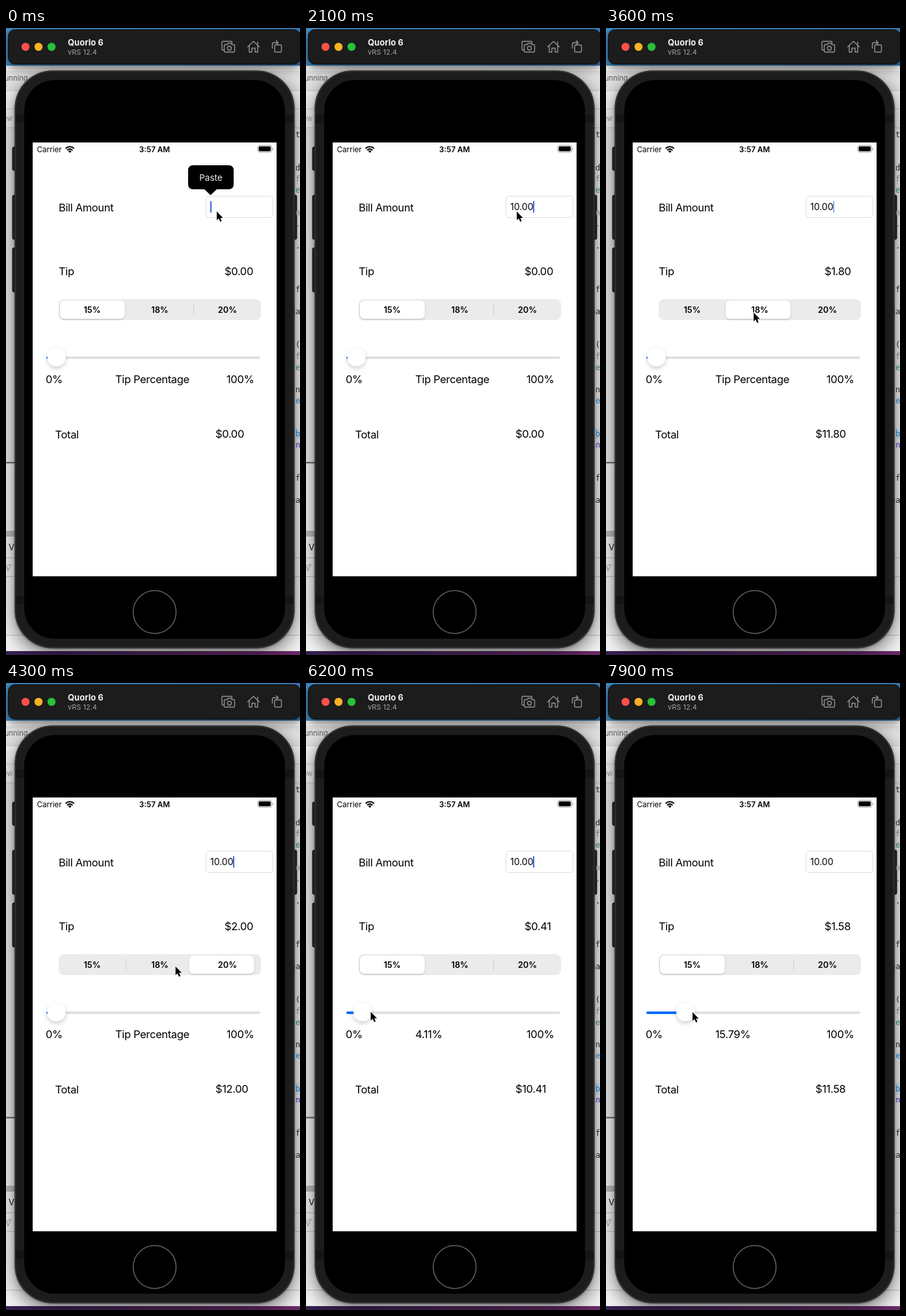
An HTML page for the animation above (8 s loop, 452 by 964 pixels).

```html
<!DOCTYPE html>
<html lang="en">
<head>
<meta charset="utf-8">
<title>Tip calculator</title>
<style>
  html, body { margin: 0; width: 100%; height: 100%; overflow: hidden; background: #fff; }
  svg { display: block; width: 452px; height: 964px; font-family: Inter, Roboto, sans-serif; }
  .label { font-size: 16.5px; letter-spacing: -.35px; }
  .segment { font-size: 12.8px; font-weight: 600; text-anchor: middle; }
  .code { font: 12px "DejaVu Sans Mono", monospace; }
  .icon { fill: none; stroke: #929292; stroke-width: 1.4; stroke-linejoin: round; stroke-linecap: round; }
</style>
</head>
<body>
<svg viewBox="0 0 452 964">
  <defs>
    <linearGradient id="wall"><stop stop-color="#3d8dc8"/><stop offset="1" stop-color="#3b7fbd"/></linearGradient>
    <linearGradient id="dusk"><stop stop-color="#33204f"/><stop offset="1" stop-color="#6b2a68"/></linearGradient>
    <filter id="deviceShadow" x="-20%" y="-10%" width="140%" height="120%">
      <feDropShadow dx="0" dy="1" stdDeviation="2" flood-opacity=".35"/>
      <feDropShadow dx="0" dy="8" stdDeviation="15" flood-opacity=".55"/>
    </filter>
    <filter id="barShadow" x="-10%" y="-50%" width="120%" height="250%">
      <feDropShadow dx="0" dy="6" stdDeviation="8" flood-opacity=".5"/>
    </filter>
    <filter id="thumbShadow" x="-20%" y="-30%" width="140%" height="180%">
      <feDropShadow dx="0" dy="1.5" stdDeviation="1.8" flood-opacity=".18"/>
    </filter>
    <filter id="knobShadow" x="-60%" y="-60%" width="220%" height="240%">
      <feDropShadow dx="0" dy="3" stdDeviation="3.5" flood-opacity=".2"/>
    </filter>
  </defs>

  <!-- Desktop and editor behind the device -->
  <rect width="452" height="964" fill="#f4f4f4"/>
  <rect width="452" height="58" fill="url(#wall)"/>
  <path d="M0 66H452V96H0Z" fill="#e2e2e2"/>
  <path d="M0 96.5H452M0 124.5H452M0 153.5H452" stroke="#cfcfcf"/>
  <path d="M0 154H30V667H0Z" fill="#eaeaea"/>
  <path d="M0 773H30V782H0Z" fill="#bdbdbd"/>
  <path d="M0 667H30V669.5H0Z" fill="#777"/>
  <path d="M0 814.5H30M0 843.5H30M430 814.5H452M430 843.5H452M0 933.5H452" stroke="#c2c2c2"/>
  <path d="M430 615H452V632H430Z" fill="#dcecf8"/>
  <rect y="958" width="452" height="6" fill="url(#dusk)"/>

  <!-- Simulator title bar -->
  <g filter="url(#barShadow)"><rect x="3.5" y="2.5" width="449" height="53" rx="10" fill="#1c1c1d" stroke="#0c0c0c"/></g>
  <circle cx="30" cy="29" r="6.2" fill="#fe5048"/>
  <circle cx="50" cy="29" r="6.2" fill="#fdb225"/>
  <circle cx="70" cy="29" r="6.2" fill="#27c13b"/>
  <text x="95" y="27" font-size="13" font-weight="700" fill="#f2f2f2">Quorlo 6</text>
  <text x="95" y="41" font-size="11" fill="#a0a0a0">vRS 12.4</text>
  <g class="icon">
    <path d="M335 34H333.5Q332 34 332 32.5V22Q332 20.5 333.5 20.5H346Q347.5 20.5 347.5 22V23"/>
    <path d="M337.5 25.5H340L341.5 23.5H346L347.5 25.5H350Q351.5 25.5 351.5 27V35.5Q351.5 37 350 37H337Q335.5 37 335.5 35.5V27Q335.5 25.5 337.5 25.5Z"/>
    <circle cx="343.5" cy="31" r="3"/>
    <path d="M371.5 29L380.5 20.5L389.5 29M374 27V37H378V31H383V37H387V27M387 25V21.5"/>
    <rect x="413" y="26" width="10.5" height="11" rx="1.5"/>
    <path d="M409.5 31V25Q409.5 22.5 412 22.5H418M415.5 19.5L418.5 22.5L415.5 25.5"/>
  </g>

  <!-- Device -->
  <g filter="url(#deviceShadow)"><rect x="13.5" y="65.5" width="430" height="888" rx="58" fill="#1a1a1a"/></g>
  <g fill="#202020" stroke="#111">
    <rect x="10" y="183" width="5" height="36" rx="2"/>
    <rect x="10" y="257" width="5" height="68" rx="2"/>
    <rect x="10" y="338" width="5" height="68" rx="2"/>
    <rect x="442" y="257" width="5" height="68" rx="2"/>
  </g>
  <rect x="14.5" y="66.5" width="428" height="886" rx="57" fill="none" stroke="#303030" stroke-width="2"/>
  <path d="M15 133H28V146H15ZM429 133H442V146H429ZM15 873H28V886H15ZM429 873H442V886H429Z" fill="#151515"/>
  <rect x="28" y="80" width="401" height="859" rx="47"/>
  <circle cx="228.5" cy="898" r="33" fill="none" stroke="#606060" stroke-width="1.5"/>
  <rect x="41" y="176" width="375" height="667" fill="#fff"/>

  <!-- Editor text peeking out on both sides -->
  <svg width="14" height="964" font-size="11" fill="#777">
    <text x="-5" y="143" fill="#888">ew</text>
    <text x="4" y="803" font-size="13" fill="#111">Vi</text>
    <path d="M-2 829L8 824L3 835L2 830Z" fill="none" stroke="#888"/>
  </svg>
  <svg width="40" height="85" font-size="11" fill="#666">
    <path id="cornerText"/>
    <text x="-2" y="81" textLength="0" visibility="hidden"></text>
  </svg>
  <svg x="443.5" width="8.5" height="964" viewBox="443.5 0 8.5 964"><g id="code" class="code"></g></svg>
  <text x="-2" y="81" font-size="11" fill="#555">unning</text>

  <!-- Status bar -->
  <text x="47.5" y="190.5" font-size="11.7">Carrier</text>
  <path d="M91.7 185.2A9.2 9.2 0 0 1 104.700 185.2M94.2 187.9A5.6 5.6 0 0 1 102.2 187.9" fill="none" stroke="#000" stroke-width="2.2"/>
  <path d="M98.2 192L95.8 189.5A3.5 3.5 0 0 1 100.6 189.5Z"/>
  <text x="228.5" y="190.5" font-size="11.7" font-weight="600" text-anchor="middle">3:57 AM</text>
  <rect x="387" y="180.5" width="21.5" height="10.5" rx="3" fill="none" stroke="#999"/>
  <rect x="388.5" y="182" width="18.5" height="7.5" rx="1.8"/>
  <path d="M409.7 184A2.5 2.5 0 0 1 409.7 188Z" fill="#999"/>

  <!-- Form -->
  <g class="label">
    <text x="81" y="281.5">Bill Amount</text>
    <text x="81" y="379.5">Tip</text>
    <text x="336" y="379.5" id="tip"></text>
    <text x="61" y="545.5">0%</text>
    <text x="168" y="545.5" id="percent"></text>
    <text x="339" y="545.5">100%</text>
    <text x="75.5" y="630.5">Total</text>
    <text x="322" y="629.5" id="total"></text>
  </g>
  <rect x="307.5" y="258.5" width="103" height="33" rx="4.5" fill="#fff" stroke="#dedede"/>
  <text id="bill" x="314" y="280" font-size="14"></text>
  <rect id="caret" y="266" width="2" height="18" rx="1" fill="#3c66e4"/>
  <g id="paste">
    <path d="M288 211H342Q350 211 350 219V240Q350 248 342 248H324L314.5 257L305 248H288Q280 248 280 240V219Q280 211 288 211Z"/>
    <text x="315" y="234.5" font-size="13.5" fill="#eee" text-anchor="middle">Paste</text>
  </g>

  <rect x="81" y="417" width="311" height="32" rx="8" fill="#ebebec"/>
  <path id="leftDivider" d="M184.5 424V442" stroke="#d0d0d2"/>
  <path id="rightDivider" d="M288.5 424V442" stroke="#d0d0d2"/>
  <rect id="thumb" y="419" width="99.5" height="28" rx="6.5" fill="#fff" filter="url(#thumbShadow)"/>
  <g class="segment">
    <text x="132.5" y="437.5">15%</text>
    <text x="236.5" y="437.5">18%</text>
    <text x="340.5" y="437.5">20%</text>
  </g>

  <rect x="62" y="505" width="329" height="4" rx="2" fill="#e2e2e3"/>
  <rect id="fill" x="62" y="505" height="4" rx="2" fill="#046cfa"/>
  <circle id="knob" cy="506" r="14" fill="#fff" filter="url(#knobShadow)"/>

  <path id="pointer" d="M0 0V13.5L3.1 10.700L5.3 15.800L7.600 14.900L5.500 9.900H9.600Z" stroke="#fff" stroke-width="1.2" paint-order="stroke"/>
</svg>
<script>
const LOOP = 8000, STEP = 100, DRAG_START = 5900;
const BILL = "10.00", KEY_TIMES = [900, 1100, 1400, 1600, 1800];
const RATES = [15, 18, 20], THUMB_X = [83, 184, 290], SLIDE = 415;
const TAPS = [[3000, 1], [4000, 2], [4700, 0]]; // time, segment
const POINTER = [ // time, x, y
  [0, 324, 282], [2300, 324, 282], [2900, 227, 437.5], [3600, 227, 437.5], [3900, 331, 435],
  [4100, 331, 435], [4600, 131, 437], [4750, 131, 437], [5000, 147, 460.5], [5600, 90, 505],
  [DRAG_START, 90, 505], [6200, 99.5, 505.5], [6900, 110, 506.5], [7900, 133, 506]
];
const VALUE = [[0, 1], [DRAG_START, 1], [6200, 4.11], [6900, 8.39], [7900, 15.79]];

const ui = Object.fromEntries([...document.querySelectorAll("[id]")].map(el => [el.id, el]));
const clamp = x => Math.max(0, Math.min(1, x));
const smooth = x => x * x * (3 - 2 * x);
const money = x => "$" + x.toFixed(2);
const show = (el, on) => el.setAttribute("visibility", on ? "visible" : "hidden");

function track(keys, t, ease = x => x) {
  const i = keys.findIndex(k => k[0] > t);
  if (i < 0) return keys.at(-1).slice(1);
  const a = keys[i - 1], b = keys[i], p = ease((t - a[0]) / (b[0] - a[0]));
  return a.slice(1).map((v, n) => v + (b[n + 1] - v) * p);
}

// Code on the right edge: y, text, colour
const INK = "#222", GREY = "#777", TEAL = "#2c7565", BLUE = "#1470b8";
for (const [y, text, color] of [
  [168, "t", INK], [219, "d", INK], [236, "f", GREY], [253, "e", TEAL], [288, "n", GREY],
  [305, ".", BLUE], [339, ".", INK], [406, "f", INK], [440, "na", INK], [491, "(", INK],
  [509, "f", GREY], [526, "e", TEAL], [560, "n", INK], [577, "le", BLUE], [628, "b", BLUE],
  [645, "in", "#402a9c"], [696, "f", INK], [730, "na", INK]
]) ui.code.insertAdjacentHTML("beforeend",
  `<text x="${text.length > 1 ? 438 : 445}" y="${y}" fill="${color}">${text}</text>`);

function caretOpacity(t) {
  if (t >= KEY_TIMES[0] && t < 2500) return 1;
  const phase = ((t < KEY_TIMES[0] ? t + 500 : t) % 1000) / 1000;
  return phase < .5 ? clamp((phase + .1) / .15)
    : Math.max(clamp((.7 - phase) / .17), clamp((phase - .9) / .15));
}

function draw(t) {
  const typed = KEY_TIMES.filter(k => k <= t).length;
  ui.bill.textContent = BILL.slice(0, typed);
  ui.caret.setAttribute("x", typed ? 314 + ui.bill.getComputedTextLength() - .5 : 314);
  ui.caret.setAttribute("opacity", caretOpacity(t));
  show(ui.paste, !typed);

  const taps = TAPS.filter(k => k[0] <= t), last = taps.at(-1);
  const segment = last ? last[1] : 0, previous = taps.length > 1 ? taps.at(-2)[1] : 0;
  const left = last ? (1 - clamp((t - last[0]) / SLIDE)) ** 2 : 0;
  ui.thumb.setAttribute("x", THUMB_X[segment] + (THUMB_X[previous] - THUMB_X[segment]) * left);
  show(ui.leftDivider, segment === 2);
  show(ui.rightDivider, segment === 0);

  const [value] = track(VALUE, t), dragging = t > DRAG_START;
  const knobX = 74.5 + value * 3.02;
  ui.knob.setAttribute("cx", knobX);
  ui.fill.setAttribute("width", knobX - 62);
  ui.percent.textContent = dragging ? value.toFixed(2) + "%" : "Tip Percentage";

  const tip = BILL * (dragging ? value : RATES[segment]) / 100;
  ui.tip.textContent = money(last ? tip : 0);
  ui.total.textContent = money(last ? +BILL + tip : 0);

  const [x, y] = track(POINTER, t, t < DRAG_START ? smooth : undefined);
  ui.pointer.setAttribute("transform", `translate(${x} ${y})`);
}

const start = performance.now();
(function frame() {
  const t = (performance.now() - start) % LOOP;
  draw(Math.floor(t / STEP) * STEP);
  requestAnimationFrame(frame);
})();
</script>
</body>
</html>
```
